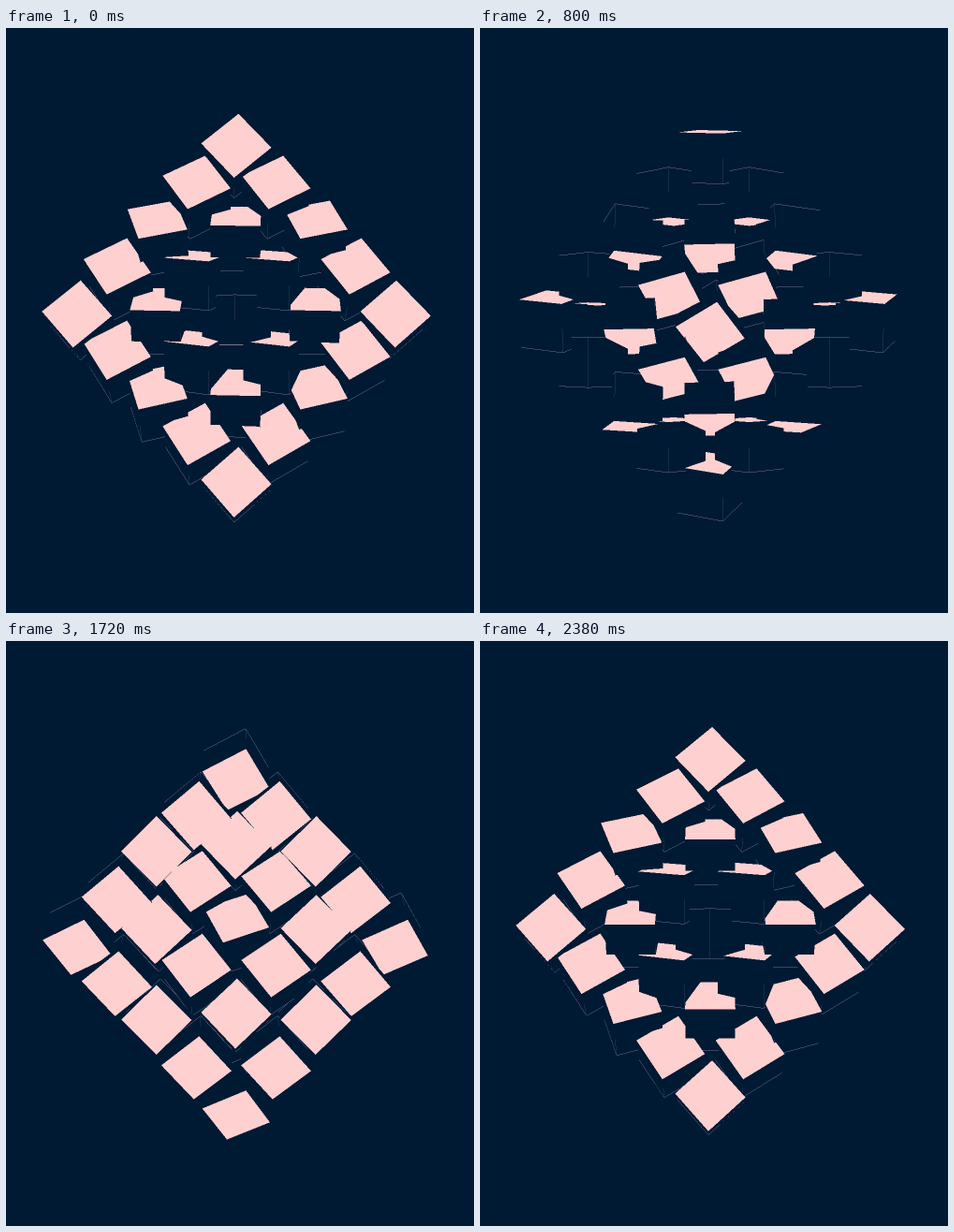
Recreate the animation shown at these times as an HTML page with a canvas. Size 500 px wide and 625 px high, loop 2.4 s.

```html
<!DOCTYPE html>
<html lang="en">
<head>
<meta charset="utf-8">
<title>Turning cubes</title>
<style>
  html, body { margin: 0; width: 100%; height: 100%; overflow: hidden; background: #001a33; }
  canvas { display: block; width: 500px; height: 625px; }
</style>
</head>
<body>
<canvas id="stage" width="500" height="625"></canvas>
<script>
const LOOP = 2400;
const LEAD = 20;                       // the loop starts one step into the turn
const RING_LAG = Math.PI / 12;         // each ring of equal distance follows the previous one
const SCALE = 2;                       // supersampling of the depth-tested buffer
const AREA = { x: 30, y: 84, w: 434, h: 458 };
const CENTER = { x: 246, y: 312.8 };
const STEP = { x: 41.6, y: 43.9 };     // half diagonals of one grid cell
const HALF = 26;                       // half the edge of a cube
const CAMERA = 1100;
const W = AREA.w * SCALE, H = AREA.h * SCALE;

const rgb = (r, g, b) => (255 << 24 | b << 16 | g << 8 | r) >>> 0;
const DARK = rgb(0, 26, 51);
const PINK = rgb(255, 208, 208);
const RIM = rgb(108, 110, 152);
const CREASE = rgb(42, 60, 94);

const stage = document.getElementById('stage').getContext('2d');
const buffer = document.createElement('canvas');
buffer.width = W;
buffer.height = H;
const bufferCtx = buffer.getContext('2d');
const image = bufferCtx.createImageData(W, H);
const pixels = new Uint32Array(image.data.buffer);
const depth = new Float32Array(W * H);

// Screen position in the buffer; q grows towards the viewer and is linear on screen.
function project(x, y, z) {
  const s = CAMERA / (CAMERA - z);
  return {
    x: (CENTER.x + x * s - AREA.x) * SCALE,
    y: (CENTER.y + y * s - AREA.y) * SCALE,
    q: s
  };
}

function cross(a, b, c) {
  return (b.x - a.x) * (c.y - a.y) - (b.y - a.y) * (c.x - a.x);
}

function middle(a, b) {
  return { x: (a.x + b.x) / 2, y: (a.y + b.y) / 2, q: (a.q + b.q) / 2 };
}

function fillQuad(quad, color) {
  const [a, b, , d] = quad;
  const det = cross(a, b, d);
  if (Math.abs(det) < 0.01) return;
  const qb = b.q - a.q, qd = d.q - a.q;
  const qx = (qb * (d.y - a.y) - qd * (b.y - a.y)) / det;
  const qy = (qd * (b.x - a.x) - qb * (d.x - a.x)) / det;
  const ys = quad.map(p => p.y);
  const top = Math.max(0, Math.ceil(Math.min(...ys) - 0.5));
  const bottom = Math.min(H - 1, Math.floor(Math.max(...ys) - 0.5));

  for (let row = top; row <= bottom; row++) {
    const y = row + 0.5;
    let left = Infinity, right = -Infinity;
    for (let i = 0; i < 4; i++) {
      const p = quad[i], r = quad[(i + 1) % 4];
      if ((p.y <= y) === (r.y <= y)) continue;
      const x = p.x + (y - p.y) / (r.y - p.y) * (r.x - p.x);
      left = Math.min(left, x);
      right = Math.max(right, x);
    }
    const first = Math.max(0, Math.ceil(left - 0.5));
    const last = Math.min(W - 1, Math.floor(right - 0.5));
    let q = a.q + (first + 0.5 - a.x) * qx + (y - a.y) * qy;
    for (let col = first, k = row * W + first; col <= last; col++, k++, q += qx) {
      if (q > depth[k]) {
        depth[k] = q;
        pixels[k] = color;
      }
    }
  }
}

function drawLine(a, b, color) {
  const n = Math.ceil(Math.max(Math.abs(b.x - a.x), Math.abs(b.y - a.y), 1));
  for (let i = 0; i <= n; i++) {
    const f = i / n;
    const x = Math.floor(a.x + (b.x - a.x) * f);
    const y = Math.floor(a.y + (b.y - a.y) * f);
    if (x < 0 || y < 0 || x >= W || y >= H) continue;
    const k = y * W + x;
    if ((a.q + (b.q - a.q) * f) * 1.001 > depth[k]) pixels[k] = color;
  }
}

// Rank of a cell's distance from the centre: 0 for the middle, 5 for the corners.
function ringOf(i, j) {
  const far = Math.max(Math.abs(i), Math.abs(j));
  const near = Math.min(Math.abs(i), Math.abs(j));
  return far * (far + 1) / 2 + near;
}

// Corners of both caps: the cube spins about its cap axis, then tilts about the x axis.
function makeCube(i, j, turn) {
  const tilt = Math.PI * (turn - 0.5) - RING_LAG * ringOf(i, j);
  const spin = -Math.PI / 4 + Math.PI / 2 * Math.cos(tilt);
  const ct = Math.cos(tilt), st = Math.sin(tilt);
  const cs = Math.cos(spin), ss = Math.sin(spin);
  const cx = (i - j) * STEP.x, cy = (i + j) * STEP.y;
  const corners = [[-1, -1], [1, -1], [1, 1], [-1, 1]];
  const cap = side => corners.map(([a, b]) => {
    const u = HALF * (a * cs + b * ss);
    const v = HALF * (b * cs - a * ss);
    const n = HALF * side;
    return project(cx + u, cy + v * ct - n * st, v * st + n * ct);
  });
  return { front: cap(1), back: cap(-1) };
}

function render(time) {
  const turn = (time + LEAD) % LOOP / LOOP;
  pixels.fill(DARK);
  depth.fill(0);
  const lines = [];

  for (let i = -2; i <= 2; i++) {
    for (let j = -2; j <= 2; j++) {
      const { front, back } = makeCube(i, j, turn);
      const frontSeen = cross(front[0], front[1], front[3]) > 0;
      const backSeen = cross(back[0], back[1], back[3]) < 0;
      if (frontSeen) fillQuad(front, PINK);
      if (backSeen) fillQuad(back, PINK);

      for (let k = 0; k < 4; k++) {
        const m = (k + 1) % 4, before = (k + 3) % 4;
        const side = [front[m], front[k], back[k], back[m]];
        if (cross(side[0], side[1], side[3]) <= 0) continue;
        fillQuad(side, DARK);
        const creased = cross(front[k], front[before], back[k]) > 0;
        const half = middle(front[k], back[k]);
        for (const [cap, seen] of [[front, frontSeen], [back, backSeen]]) {
          if (seen) continue;
          lines.push([cap[k], cap[m], RIM]);
          if (creased) lines.push([cap[k], half, CREASE]);
        }
      }
    }
  }

  for (const line of lines) drawLine(...line);
  bufferCtx.putImageData(image, 0, 0);
  stage.fillStyle = '#001a33';
  stage.fillRect(0, 0, 500, 625);
  stage.drawImage(buffer, AREA.x, AREA.y, AREA.w, AREA.h);
}

function tick() {
  render(performance.now());
  requestAnimationFrame(tick);
}
tick();
</script>
</body>
</html>
```
